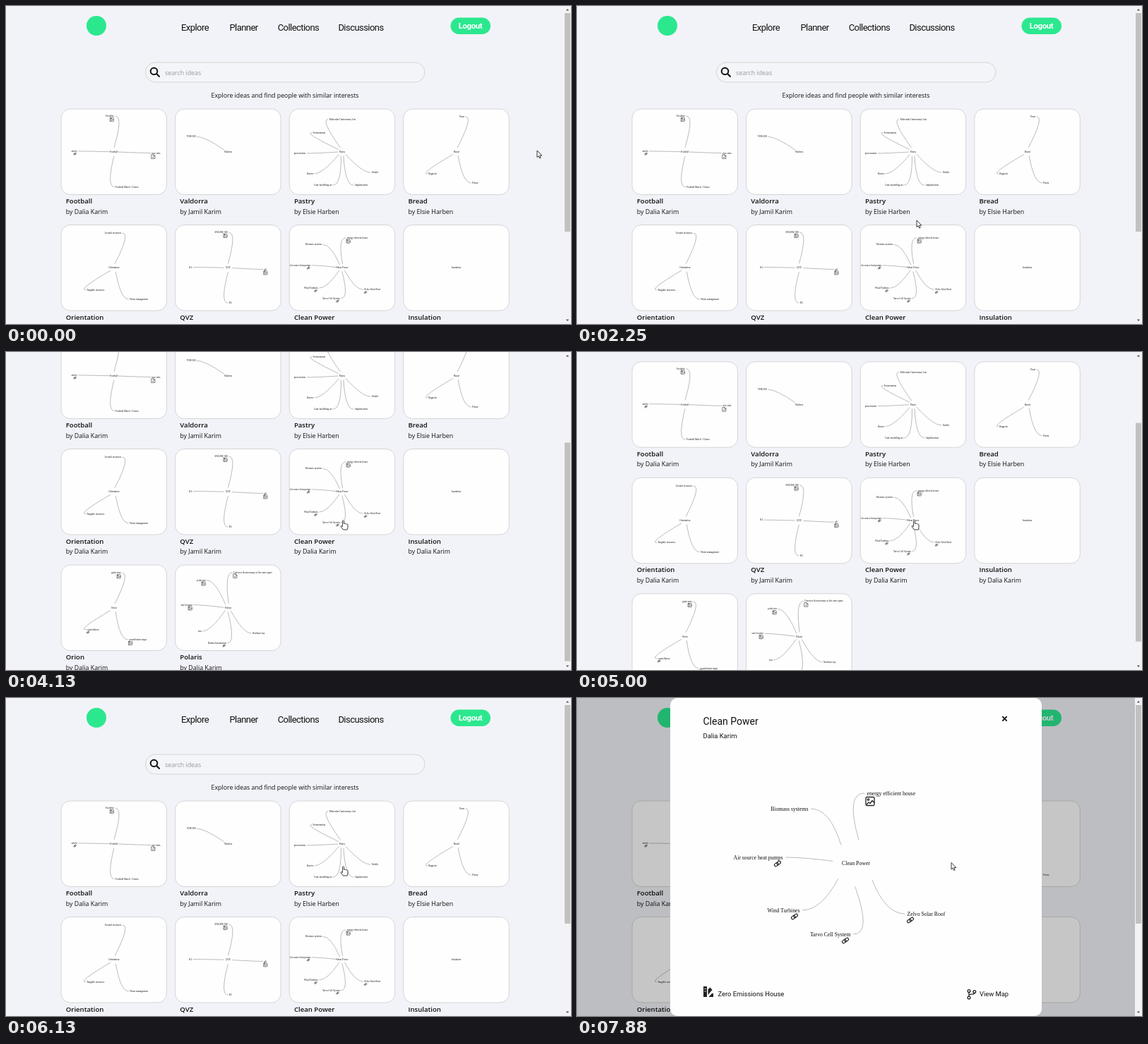
Recreate the animation shown at these times as an HTML page. Size 800 by 451 pixels, loop 8 s.

```html
<!DOCTYPE html>
<html lang="en">
<head>
<meta charset="utf-8">
<title>Idea explorer</title>
<style>
  html, body { margin: 0; width: 100%; height: 100%; overflow: hidden; background: #f2f3f8; }
  svg { display: block; width: 100%; height: 100%; }
  text { font-family: "Open Sans", "Noto Sans", sans-serif; font-size: 8.85px; fill: #111; }
  .nav text { font: 13px Roboto, sans-serif; letter-spacing: -.55px; text-anchor: middle; }
  .nav .out { font-weight: 700; font-size: 11.5px; letter-spacing: -.4px; fill: #fff; }
  .title { font-weight: 600; font-size: 9.6px; }
  .map text { font: 7.75px "Liberation Serif", serif; }
  .map .edge { fill: none; stroke: #aaa; stroke-width: .8; vector-effect: non-scaling-stroke; }
  .icon { fill: none; stroke: #222; stroke-width: 1.3; stroke-linejoin: round; stroke-linecap: round; }
  .modal > text { font: 9.4px Roboto, sans-serif; }
  .modal > .head { font-size: 14px; }
  .cursor { fill: #fff; stroke: #222; stroke-width: .9; stroke-linejoin: round; }
</style>
</head>
<body>
<svg viewBox="0 0 800 451" preserveAspectRatio="none">
  <rect width="800" height="451" fill="#f2f3f8"/>
  <g id="page">
    <circle cx="128" cy="28" r="14" fill="#2be88f"/>
    <g class="nav">
      <text x="267.5" y="35">Explore</text>
      <text x="336.5" y="35">Planner</text>
      <text x="414" y="35">Collections</text>
      <text x="502.5" y="35">Discussions</text>
      <rect x="629.5" y="16.5" width="56.5" height="23.5" rx="11.75" fill="#2be88f"/>
      <text class="out" x="657.5" y="32.3">Logout</text>
    </g>
    <rect x="197.5" y="80" width="395.5" height="28" rx="14" fill="#f4f5f9" stroke="#ccc" stroke-width=".8"/>
    <g fill="none" stroke="#111" stroke-width="2" stroke-linecap="round">
      <circle cx="209.5" cy="92.5" r="4.8"/><path d="M213.2 96.2l3.8 3.8"/>
    </g>
    <text x="225" y="97.5" style="fill:#999">search ideas</text>
    <text x="395" y="130.3" text-anchor="middle" style="font-size:8.8px">Explore ideas and find people with similar interests</text>
    <g id="cards"></g>
  </g>
  <g id="modal" class="modal">
    <rect width="790" height="451" fill="#000" opacity=".22"/>
    <rect x="132" width="526" height="451" rx="10" fill="#fefefe"/>
    <text class="head" x="178.5" y="38">Clean Power</text>
    <text x="178.5" y="57">Dalia Karim</text>
    <path d="M602.3 26.2l6.4 6.4m0-6.4l-6.4 6.4" stroke="#111" stroke-width="1.8"/>
    <g id="bigMap"></g>
    <path d="M179 409h5v15h-5zM185.5 413l3-2.6 3 3.5-6 7zM186.5 424l4.5-5h2v5z" fill="#222"/>
    <path d="M180.5 412.5h2m-2 3.5h2" stroke="#fff" stroke-width="1.2"/>
    <text x="199.5" y="423.3">Zero Emissions House</text>
    <g class="icon">
      <circle cx="555" cy="415.5" r="1.9"/><circle cx="555" cy="425" r="1.9"/><circle cx="562.8" cy="416.5" r="1.9"/>
      <path d="M555 417.5v5.5m0-1.5c0-2.500 7.800 0 7.800-3"/>
    </g>
    <text x="570" y="423.3">View Map</text>
  </g>
  <rect x="790" width="10" height="451" fill="#f3f3f6"/>
  <rect id="thumb" x="791" width="8" height="310" fill="#c1c1c1"/>
  <path d="M792.8 6.5h4.4l-2.2-2.5zM792.8 444.5h4.4l-2.2 2.5z" fill="#555"/>
  <path id="arrow" class="cursor" d="M0 0V9.6L2.2 7.6 3.7 11 5.2 10.3 3.8 7H6.8Z"/>
  <path id="hand" class="cursor" d="M-1 7V1Q0-1 1 1V5Q2 4 3 5.2 4 4.5 5 5.7 6.5 5.2 6.5 7V10Q6.5 11.5 5.5 13.5H0L-3.5 9Q-3.500 7-1 9Z"/>
</svg>
<script>
const $ = id => document.getElementById(id);
const people = ['Dalia Karim', 'Jamil Karim', 'Elsie Harben'];

// Each node: label, anchor x, anchor y, side of the label (1 right, -1 left), icon
const cards = [
  ['Football', 0, [
    ['Socialize', 4, -118, -1, 'image'], ['article', -117, -2, -1, 'link'],
    ['nice stats', 121, 4, 1, 'doc'], ['Football Match - Classic', 2, 116, 1]]],
  ['Valdorra', 1, [['VDR 200', -103, -50, -1]]],
  ['Pastry', 2, [
    ['Molecular Gastronomy Arts', -46, -107, 1], ['Fermentation', -100, -63, 1],
    ['preservation', -117, 5, -1], ['Knives', -91, 72, -1], ['Cake modelling art', -30, 110, -1],
    ['Amplification', 37, 110, 1], ['Vanilla', 93, 68, 1]]],
  ['Bread', 2, [['Yeast', 30, -116, -1], ['Baguette', -95, 73, 1], ['Pastry', 49, 103, 1]]],
  ['Orientation', 0, [
    ['Ground resources', 28, -114, -1], ['Tangible resources', -93, 73, 1],
    ['Water management', 49, 104, 1]]],
  ['QVZ', 1, [
    ['ENGINE 300', 2, -117, -1, 'image'], ['K3', -115, -2, -1],
    ['q8', 115, 5, 1, 'image'], ['K5', 0, 116, 1]]],
  ['Clean Power', 0, [
    ['energy efficient house', 12, -99, 1, 'image'], ['Biomass systems', -64, -77, -1],
    ['Air source heat pumps', -100, -8, -1, 'link'], ['Wind Turbines', -76, 67, -1, 'link'],
    ['Tarvo Cell System', -4, 101, -1, 'link'], ['Zelvo Solar Roof', 69, 72, 1, 'link']]],
  ['Insulation', 0, []],
  ['Orion', 0, [
    ['giant stars', 27, -115, -1, 'image'], ['constellation', -93, 72, 1, 'link'],
    ['constellation maps', 46, 105, 1, 'image']]],
  ['Polaris', 0, [
    ['Universe &amp; astronomy of the outer space', 15, -117, 1, 'doc'], ['polar star', -70, -91, -1, 'image'],
    ['star location', -114, -10, -1, 'image'], ['star', -84, 77, -1],
    ['Radius Information', -2, 116, -1, 'link'], ['Northern sky', 77, 84, 1]]]
];

const icons = {
  image: '<rect x="-6" y="-3.5" width="12" height="12" rx="1.5"/><circle cx="-2.5" cy="0" r="1.2"/><path d="M-5 7l3-3 2 1.5 3-4 3 3"/>',
  link: '<g transform="rotate(-35)" stroke-width="1.1"><rect x="-5" y="-2" width="6" height="4" rx="2"/><rect x="-1" y="-2" width="6" height="4" rx="2"/></g>',
  doc: '<path d="M-5-3.5h7l4 4v9h-11zM2-3.5v4h4M-2 5h4"/>'
};

// gap: share of the way to the root that is left open
function node([label, x, y, side, icon], gap) {
  const edge = `<path class="edge" d="M${x} ${y}Q${x - side * 27} ${y} ${x * gap} ${y * gap}"/>`;
  const text = `<text x="${x + side * 3.5}" y="${y + 2.5}" text-anchor="${side > 0 ? 'start' : 'end'}">${label}</text>`;
  const inset = side > 0 ? 8 : 11;
  const mark = icon ? `<g class="icon" transform="translate(${x + side * inset} ${y + 9})">${icons[icon]}</g>` : '';
  return edge + text + mark;
}

const mindMap = ([name, , nodes], x, y, scale, gap) =>
  `<g class="map" transform="translate(${x} ${y}) scale(${scale})">${nodes.map(n => node(n, gap)).join('')}
   <text y="2.5" text-anchor="middle">${name}</text></g>`;

$('cards').innerHTML = cards.map((card, i) => {
  const x = 78 + 161.6 * (i % 4), y = 146 + 164.5 * Math.floor(i / 4);
  return `<rect x="${x}" y="${y}" width="149.5" height="121.5" rx="13" fill="#fefefe" stroke="#ccc" stroke-width=".8"/>
    ${mindMap(card, x + 74.8, y + 60.8, .43, .12)}
    <text class="title" x="${x + 6.7}" y="${y + 134}">${card[0]}</text>
    <text x="${x + 6.7}" y="${y + 148.7}">by ${people[card[1]]}</text>`;
}).join('');
$('bigMap').innerHTML = mindMap(cards[6], 395, 234, 1, .33);

const scrollKeys = [[2500, 0], [3000, 59], [3125, 59], [3625, 118], [3750, 118], [4125, 173],
  [4750, 173], [5125, 118], [5250, 118], [5750, 59], [6125, 0]];
const cursorKeys = [[500, 752, 205], [2250, 481, 304], [2625, 472, 240], [3500, 472, 240],
  [3750, 477.5, 238.5], [6125, 477.5, 238.5], [7000, 478, 350], [7250, 478, 350], [7875, 530, 233.5]];

// Smoothly interpolated value of a key list, column c, at time t
function at(keys, t, c = 1) {
  const n = keys.findIndex(k => k[0] > t);
  if (n < 0) return keys[keys.length - 1][c];
  if (n === 0) return keys[0][c];
  const a = keys[n - 1], b = keys[n], p = (t - a[0]) / (b[0] - a[0]);
  return a[c] + (b[c] - a[c]) * p * p * (3 - 2 * p);
}

function draw(now) {
  const t = Math.floor(now % 8000 / 125) * 125;
  const scroll = at(scrollKeys, t);
  $('page').setAttribute('transform', `translate(0 ${-scroll})`);
  $('thumb').setAttribute('y', 10 + 118.5 * scroll / 173);
  $('modal').setAttribute('opacity', at([[7000, 0], [7375, 1]], t));
  const hand = t >= 3625 && t < 7250;
  for (const id of ['arrow', 'hand']) {
    $(id).setAttribute('transform', `translate(${at(cursorKeys, t)} ${at(cursorKeys, t, 2)})`);
    $(id).setAttribute('visibility', (id === 'hand') === hand ? 'visible' : 'hidden');
  }
  requestAnimationFrame(draw);
}
draw(performance.now());
</script>
</body>
</html>
```
